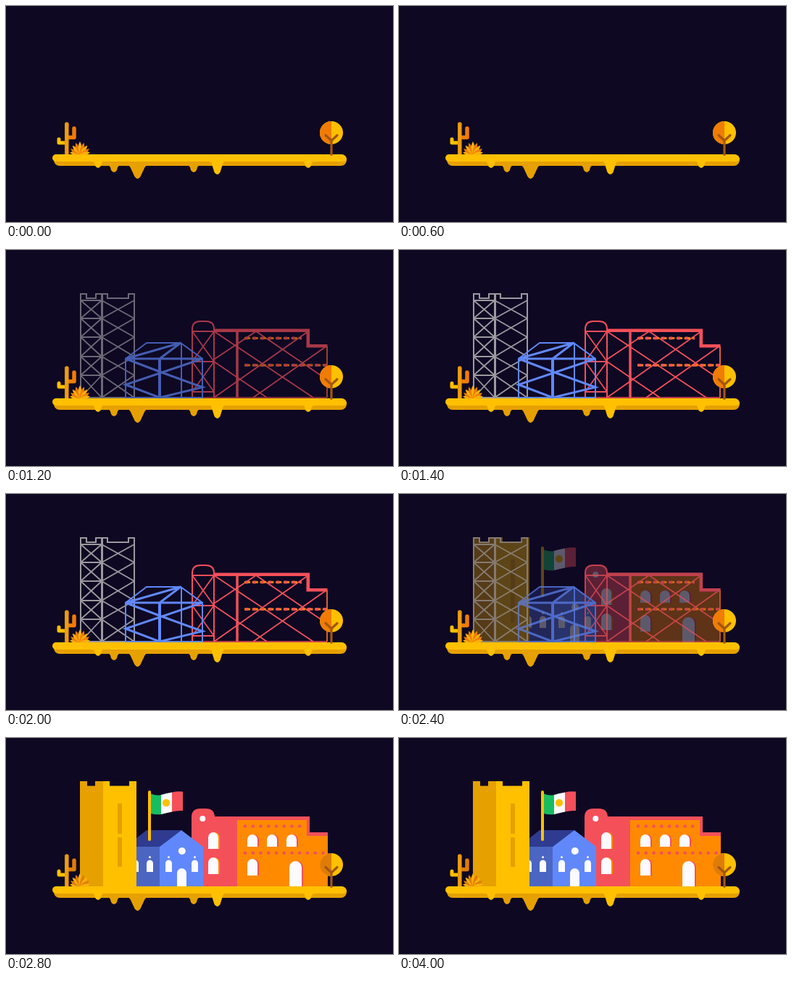
An HTML page for the animation above (4.8 s loop, 534 by 300 pixels).

```html
<!DOCTYPE html>
<html lang="en">
<head>
<meta charset="utf-8">
<title>Building the town</title>
<style>
  html, body { margin: 0; width: 100%; height: 100%; overflow: hidden; background: #0e0823; }
  svg { display: block; width: 100vw; height: 100vh; --ember: #f07c05; }
</style>
</head>
<body>
<svg id="stage" viewBox="0 0 534 300"></svg>
<script>
const YELLOW = '#ffc000', AMBER = '#e6a000', ORANGE = '#ff8a00', RED = '#f4505a',
  BLUE = '#6088fa', WHITE = '#fbfaff', GREY = '#9c9a9e', EMBER = 'var(--ember)';

const fill = (d, color) => `<path d="${d}" style="fill:${color}"/>`;
const line = (d, color, width = 2, extra = '') =>
  `<path d="${d}" fill="none" style="stroke:${color}" stroke-width="${width}" ${extra}/>`;
const dot = (x, y, r, color) => `<circle cx="${x}" cy="${y}" r="${r}" fill="${color}"/>`;
const round = 'stroke-linecap="round" stroke-linejoin="round"';

const archPath = (x, y, w, h) =>
  `M${x} ${y + h}V${y + w / 2}a${w / 2} ${w / 2} 0 0 1 ${w} 0V${y + h}z`;
const arch = (x, y, w, h, shade) =>
  (shade ? fill(archPath(x + 2, y, w, h), shade) : '') + fill(archPath(x, y, w, h), WHITE);

const drip = (x, y, w, tip, color) => fill(
  `M${x - w} ${y}q2 0 4 3L${x - 4} ${tip - 3}Q${x} ${tip + 3} ${x + 4} ${tip - 3}L${x + w - 4} ${y + 3}q2 -3 4 -3z`, color);

function ground() {
  return fill('M72 206H462a8 8 0 0 1 0 16H74a8 8 0 0 1 -8 -8z', AMBER) +
    fill('M69 206H462q8 0 8 8q-2 2 -5 2H69a5 5 0 0 1 0 -10z', YELLOW) +
    [[149, 9, 231], [181.5, 14, 240], [259, 9, 231]]
      .map(([x, w, tip]) => drip(x, 221, w, tip, AMBER)).join('') +
    [[127, 9, 225], [291.5, 12, 234], [417, 9, 225]]
      .map(([x, w, tip]) => drip(x, 215, w, tip, YELLOW)).join('');
}

function plants() {
  let out = line('M73 185V190H82', YELLOW, 5, round) +
    line('M94 170V182.5H86', EMBER, 5.5, round) +
    line('M83.8 164V206', '#e6960a', 5.6) + dot(83.8, 164, 2.8, '#e6960a') +
    line('M84 165V206', '#f6a21a', 1.5);
  for (let i = -4; i <= 4; i++) {
    const size = 18 - Math.abs(i);
    out += `<g transform="translate(102 206) rotate(${i * 20})">` +
      fill(`M0 0Q4.4 ${-size * .6} 0 ${-size}Q-4.4 ${-size * .6} 0 0z`, i % 2 ? EMBER : '#f9b00a') + '</g>';
  }
  return out + dot(449, 176, 16, YELLOW) +
    fill('M449 160a16 16 0 0 0 0 32z', EMBER) +
    line('M449 206.5V187M441 179.5L449 187L457 179.5', '#a3560f', 3.2, round);
}

function wires() {
  const levels = [70, 95, 121, 148, 174, 205];
  let braces = '';
  levels.slice(1).forEach((y, i) => {
    const top = levels[i];
    braces += `M103 ${top}H132M103 ${top}L132 ${y}M132 ${top}L103 ${y}M132 ${top}L177 ${y}M177 ${top}L132 ${y}`;
  });
  return line('M103 205V61H111V67H124V61H140V67H169V61H177V205z', GREY) +
    line(braces, GREY, 1.8) + line('M132.5 61V205', GREY, 3) +
    // hall
    line('M257 205V110q0 -11 11 -11h8q11 0 11 11V205M257 113H287M257 155H287M257 197H287', RED) +
    line('M257 113L287 155L257 197M287 113L257 155L287 197M257 205H443', RED, 1.7) +
    line('M287 113L424 205M345 113L443 180M287 155L360 205M287 152L345 113M287 205L417 113M341 205L443 133', RED, 1.8) +
    line('M319 112V205', RED, 3.5) + line('M287 111.8H416.8V133.2H443.5', RED, 4.6) +
    line('M443 134V205', '#f26a30', 1.8) +
    line('M329 122.5H408M329 160H443', ORANGE, 3, 'stroke-dasharray="8 2.8"') +
    line('M330 122.5H408M330 160H443', RED, 4, 'stroke-dasharray="4 6.8"') +
    // house
    line('M165 151L194 129H241L271 151V205H165zM242 129V205', BLUE) +
    line('M165 151H271M165 151L241 129L212 151M212 169L165 151M271 151L165 187L212 205L271 190.5L212 169', BLUE, 3) +
    line('M212 151V205', BLUE, 4);
}

function buildings() {
  const studs = (y, n) => Array.from({ length: n }, (_, i) =>
    dot(330 + i * 10.75, y, 2.3, RED)).join('');
  return '' +
    // hall
    fill('M256 206V110q0 -12 12 -12h8q11 0 12 11H419V131H444V206z', RED) +
    fill('M319 114H415V136H444V206H319z', ORANGE) +
    studs(122.5, 8) + studs(159.8, 11) + dot(271.3, 112, 4, WHITE) +
    arch(279, 131, 14, 23, ORANGE) + arch(279, 166, 14, 23, ORANGE) +
    [333, 360, 387].map(x => arch(x, 134, 14, 17, RED)).join('') +
    arch(333, 168, 14, 23, RED) + arch(391, 171, 17, 35, RED) +
    // house
    fill('M165 151H212V206H165z', '#4b66c2') +
    fill('M165 151L194 128H242L212 151z', '#2e3b90') +
    fill('M212 206V151L242 128L272 151V206z', BLUE) +
    [174, 194, 220, 256].map(x => arch(x, 169.5, 9, 16.5) + dot(x + 4.5, 165.5, 1.5, WHITE)).join('') +
    arch(236, 181, 13, 25) + dot(242.8, 157, 5, WHITE) +
    // flag
    fill('M200 77.5Q207 80.5 214 79V106Q207 107 200 105z', '#18bd62') +
    fill('M214 79Q221 76.5 229 75.5V102.5Q221 104 214 106z', WHITE) +
    fill('M229 75.5Q236 73.5 244 74.5V101Q236 100.5 229 102.5z', RED) +
    dot(221, 90, 5.2, YELLOW) + line('M198 75V141', YELLOW, 4, round) +
    // tower
    fill('M102 206V60H112V66.5H123V60H134V206z', AMBER) +
    fill('M134 206V60H143V66.5H170V60H180V206z', YELLOW) +
    fill('M154 91h6v42h-6zM154 138h6v41h-6z', AMBER);
}

const stage = document.getElementById('stage');
stage.innerHTML = ground() + `<g id="solid">${buildings()}</g><g id="wire">${wires()}</g>` + plants();
const solid = document.getElementById('solid'), wire = document.getElementById('wire');

// Opacity climbs in three 200 ms steps from the given start.
const steps = (t, start) => Math.max(0, Math.min(3, Math.floor((t - start) / 200) + 1)) / 3;

function draw(now) {
  const t = now % 4800, built = steps(t, 2400);
  wire.setAttribute('opacity', steps(t, 1000) - built);
  solid.setAttribute('opacity', built);
  stage.style.setProperty('--ember', built === 1 ? '#df7c08' : '#f07c05');
  requestAnimationFrame(() => draw(performance.now()));
}
draw(performance.now());
</script>
</body>
</html>
```
